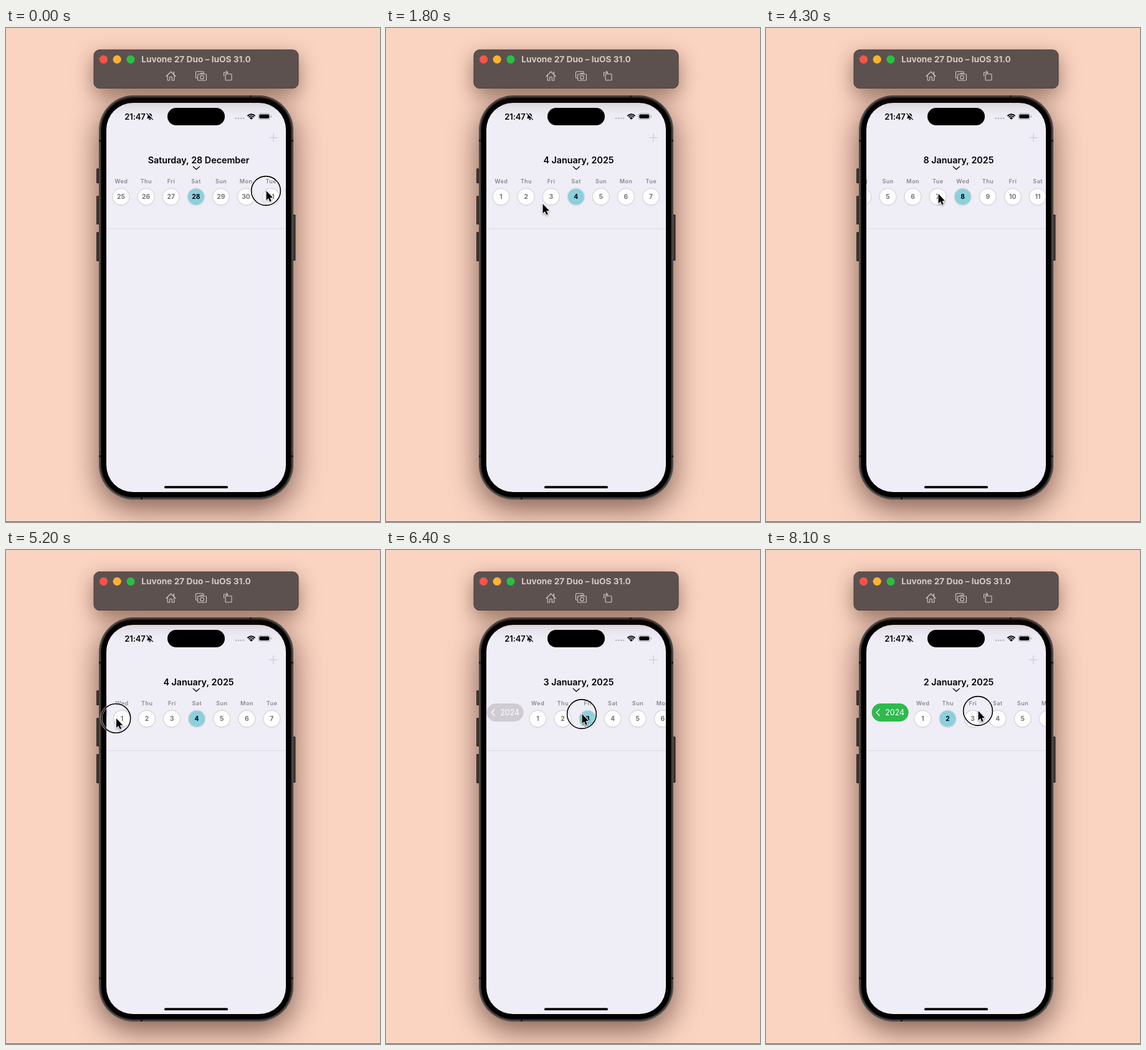
Animation of 600x792 px, one loop 8.2 s. Source, as an HTML page with a canvas:

```html
<!DOCTYPE html>
<html lang="en">
<head>
<meta charset="utf-8">
<title>Week strip</title>
<style>
html, body { margin: 0; width: 100%; height: 100%; overflow: hidden; background: #fad3c1; }
canvas { display: block; width: 600px; height: 792px; }
</style>
</head>
<body>
<canvas id="stage"></canvas>
<script>
const W = 600, H = 792, LOOP = 8200, STEP = 100;
const MID = 304.8, GAP = 40.08, SWITCH = 1200;
const SANS = 'Inter, "Liberation Sans", sans-serif';
const canvas = document.getElementById('stage');
const ratio = window.devicePixelRatio || 1;
canvas.width = W * ratio;
canvas.height = H * ratio;
const ctx = canvas.getContext('2d');

// Cursor keys: time, x, y
const PATH = [
  [0, 417, 261], [900, 254, 278], [1200, 251, 282], [1900, 251, 282],
  [2500, 276, 266], [4500, 276, 266], [5100, 174, 270], [6400, 314, 263],
  [8000, 340, 258], [LOOP, 340, 258]
];

const clamp = (v, a, b) => Math.min(b, Math.max(a, v));
const ease = u => u * u * (3 - 2 * u);
const ramp = (t, start, length) => ease(clamp((t - start) / length, 0, 1));
const rubber = x => 250 * (1 - 1 / (x * 0.55 / 250 + 1));

function cursorAt(t) {
  let i = 1;
  while (PATH[i][0] < t) i++;
  const [t0, x0, y0] = PATH[i - 1], [t1, x1, y1] = PATH[i];
  const u = ramp(t, t0, t1 - t0);
  return { x: x0 + (x1 - x0) * u, y: y0 + (y1 - y0) * u };
}

// Days are counted from 28 December; pull is the overscroll in pixels.
function stateAt(t) {
  const cursor = cursorAt(t);
  const newYear = t >= SWITCH;
  const pressed = !newYear || t >= 5100;
  let pull = 0, center = 0;
  if (!newYear) {
    pull = rubber(Math.max(0, 417 - cursor.x));
    center = pull / GAP;
  } else {
    center = 7 + 7.1 * (ramp(t, 2700, 950) - ramp(t, 3770, 1097));
    if (pressed) {
      pull = rubber(Math.max(0, cursor.x - 174));
      center -= pull / GAP;
    }
  }
  return { cursor, newYear, pressed, pull, center };
}

function box(x, y, w, h, r, fill) {
  ctx.beginPath();
  ctx.roundRect(x, y, w, h, r);
  if (fill) {
    ctx.fillStyle = fill;
    ctx.fill();
  }
}

function disc(x, y, r, fill) {
  ctx.beginPath();
  ctx.arc(x, y, r, 0, Math.PI * 2);
  if (fill) {
    ctx.fillStyle = fill;
    ctx.fill();
  }
}

function stroke(color, width) {
  ctx.strokeStyle = color;
  ctx.lineWidth = width;
  ctx.stroke();
}

function line(points, color, width) {
  ctx.beginPath();
  points.forEach(([x, y], i) => i ? ctx.lineTo(x, y) : ctx.moveTo(x, y));
  stroke(color, width);
}

function text(str, x, y, font, color, spacing = 0) {
  ctx.font = font + ' ' + SANS;
  ctx.letterSpacing = spacing + 'px';
  ctx.textAlign = 'center';
  ctx.fillStyle = color;
  ctx.fillText(str, x + spacing / 2, y);
}

function shadow(color, blur, dy) {
  ctx.shadowColor = color;
  ctx.shadowBlur = blur * ratio;
  ctx.shadowOffsetY = dy * ratio;
}

const noShadow = () => shadow('transparent', 0, 0);

function drawToolbar() {
  shadow('rgba(60,25,10,.5)', 32, 11);
  box(141, 35, 328, 62, 9, '#5d5150');
  noShadow();
  box(141, 35, 328, 61.5, 9);
  stroke('#463b39', 1);
  disc(156.5, 50.3, 6.6, '#ff5248');
  disc(178.2, 50.3, 6.6, '#ffb32d');
  disc(200, 50.3, 6.6, '#29c043');
  text('Luvone 27 Duo – luOS 31.0', 305, 55, '700 13.7px', '#d5c9c5');

  const ink = '#d3c7c3';
  line([[257, 77.5], [264.5, 70], [272, 77.5]], ink, 1.2);
  line([[259.2, 76], [259.2, 84], [262.7, 84], [262.7, 78.5], [266.3, 78.5],
    [266.3, 84], [269.8, 84], [269.8, 76]], ink, 1.1);
  line([[269.3, 74.5], [269.3, 70.5]], ink, 1.4);

  line([[306, 80.5], [304.5, 79.5], [304.5, 70.5], [306, 69.8], [316, 69.8], [317.5, 71.5]], ink, 1.1);
  ctx.beginPath();
  ctx.roundRect(307.5, 74, 14, 10, 1.5);
  stroke(ink, 1.1);
  line([[311.5, 74], [312.7, 72.5], [316.3, 72.5], [317.5, 74]], ink, 1.1);
  disc(314.5, 79, 2.8);
  stroke(ink, 1.1);

  ctx.beginPath();
  ctx.roundRect(352, 73.8, 10, 10, 1);
  stroke(ink, 1.1);
  line([[349.5, 77], [349.5, 71.3], [355.5, 71.3]], ink, 1.1);
  line([[353.3, 68.8], [355.8, 71.3], [353.3, 73.6]], ink, 1.1);
}

function drawPhone() {
  for (const [x, y, h] of [[145, 225, 24], [145, 269, 46], [145, 327, 47], [460, 299, 74]]) {
    box(x, y, 4.5, h, 1.5, '#353332');
    ctx.fillStyle = '#5d5957';
    ctx.fillRect(x + 1.5, y + 2, 1, h - 4);
  }
  shadow('rgba(50,20,10,.62)', 46, 14);
  box(149, 108, 312, 648, 56, '#393736');
  noShadow();
  box(150, 109, 310, 646, 55);
  stroke('#64605d', 1);
  box(152.5, 111.5, 305, 641, 52, '#000');
  stroke('#252423', 1);
  ctx.fillStyle = '#1c1b1b';
  for (const y of [179, 685]) {
    ctx.fillRect(149, y, 4, 3);
    ctx.fillRect(457, y, 4, 3);
  }
  ctx.fillRect(391, 108, 3, 4);
  ctx.fillRect(216, 752, 3, 4);
  box(161, 120, 288, 624, 43, '#efedf6');
}

function drawBell() {
  ctx.fillStyle = '#000';
  ctx.beginPath();
  ctx.moveTo(226, 145);
  ctx.quadraticCurveTo(227.5, 143.5, 227.5, 140.5);
  ctx.bezierCurveTo(227.5, 135.8, 234, 135.8, 234, 140.5);
  ctx.quadraticCurveTo(234, 143.5, 235.5, 145);
  ctx.closePath();
  ctx.fill();
  ctx.beginPath();
  ctx.arc(230.8, 145.7, 1.8, 0, Math.PI);
  ctx.fill();
  line([[226.2, 136.2], [236.2, 146.2]], '#efedf6', 2.6);
  line([[225.6, 136.8], [235.6, 146.8]], '#000', 1.1);
}

function drawStatus() {
  text('21:47', 207, 146.6, '600 13px', '#000', -0.1);
  drawBell();
  box(259, 128, 92, 28, 14, '#000');
  for (let i = 0; i < 4; i++) disc(369 + i * 4, 144.8, 1.35, '#b9b8c0');
  for (const r of [2, 4.9, 7.8]) {
    ctx.beginPath();
    ctx.arc(393.5, 146, r, -Math.PI * 0.75, -Math.PI * 0.25);
    stroke('#000', 1.9);
  }
  disc(393.5, 145.2, 1.2, '#000');
  box(404.8, 137, 19, 9.5, 3);
  stroke('#aaa9b0', 0.9);
  box(406.3, 138.4, 16, 6.7, 2, '#000');
  box(425, 140.2, 1.2, 3.2, 0.6, '#aaa9b0');
  line([[422.5, 175.7], [435.5, 175.7]], '#d2d0d8', 1.4);
  line([[429, 169.2], [429, 182.2]], '#d2d0d8', 1.4);
  ctx.fillStyle = '#dbd9e1';
  ctx.fillRect(161, 321.3, 288, 1);
  box(254, 734.3, 102, 3.8, 1.9, '#000');
}

function drawPill(s) {
  const edge = s.newYear ? 4 : 3;
  const side = s.newYear ? -1 : 1;
  const cx = MID + (edge - s.center) * GAP + side * 52.3;
  box(cx - 29.5, 246, 59, 29, 14.5, s.pull > 61 ? '#2eba4d' : '#cfcdd3');
  text(s.newYear ? '2024' : '2025', cx - side * 7.5, 265, '400 12.4px', '#fff');
  const tip = cx + side * 22;
  line([[tip - side * 5, 255.5], [tip, 260.5], [tip - side * 5, 265.5]], '#fff', 1.3);
}

function drawDay(day, s, picked) {
  const date = new Date(2024, 11, 28 + day);
  const x = MID + (day - s.center) * GAP;
  text(date.toLocaleDateString('en-GB', { weekday: 'short' }), x, 248.8, '600 9px', '#88878d', 0.5);
  shadow('rgba(60,60,80,.16)', 2, 0.6);
  disc(x, 270.5, 13.4, picked ? '#8bd0dd' : '#fefefe');
  noShadow();
  stroke('#d6d4da', 1.1);
  text(date.getDate(), x, 274.3, '700 10.3px', picked ? '#000' : '#75747a');
}

function drawStrip(s) {
  const low = s.newYear ? 4 : -40, high = s.newYear ? 60 : 3;
  const picked = clamp(Math.round(s.center), low, high);
  const date = new Date(2024, 11, 28 + picked);
  const name = opts => date.toLocaleDateString('en-GB', opts);
  const dayMonth = date.getDate() + ' ' + name({ month: 'long' });
  const title = s.newYear ? dayMonth + ', ' + date.getFullYear() : name({ weekday: 'long' }) + ', ' + dayMonth;
  text(title, 309, 216.6, '600 14.3px', '#000');
  line([[300.3, 222.3], [305.3, 226.8], [310.3, 222.3]], '#000', 1.3);

  ctx.save();
  ctx.beginPath();
  ctx.rect(161, 232, 288, 60);
  ctx.clip();
  const first = Math.max(low, Math.floor(s.center) - 5);
  const last = Math.min(high, Math.ceil(s.center) + 5);
  for (let day = first; day <= last; day++) drawDay(day, s, day === picked);
  drawPill(s);
  ctx.restore();
}

function drawCursor({ cursor: { x, y }, pressed }) {
  if (pressed) {
    disc(x, y, 23.4);
    stroke('rgba(255,255,255,.75)', 3.2);
    stroke('#000', 1.6);
  }
  ctx.save();
  ctx.translate(x + 0.6, y);
  ctx.beginPath();
  const arrow = [[0, 0], [0, 15.2], [3.4, 12], [5.8, 17.4], [8.2, 16.4], [5.9, 11.2], [10.4, 11]];
  arrow.forEach(([px, py]) => ctx.lineTo(px, py));
  ctx.closePath();
  shadow('rgba(0,0,0,.35)', 3, 1.5);
  stroke('#fff', 1.8);
  noShadow();
  ctx.fillStyle = '#000';
  ctx.fill();
  ctx.restore();
}

function draw(t) {
  const s = stateAt(t);
  ctx.setTransform(ratio, 0, 0, ratio, 0, 0);
  ctx.lineJoin = 'round';
  ctx.lineCap = 'round';
  ctx.fillStyle = '#fad3c1';
  ctx.fillRect(0, 0, W, H);
  drawPhone();
  drawToolbar();
  drawStatus();
  drawStrip(s);
  drawCursor(s);
  ctx.fillStyle = '#6e5f58';
  ctx.fillRect(0, 791, W, 1);
}

const start = performance.now();
let shown = -1;
function tick() {
  const t = Math.floor((performance.now() - start) % LOOP / STEP) * STEP;
  if (t !== shown) {
    shown = t;
    draw(t);
  }
  requestAnimationFrame(tick);
}
tick();
</script>
</body>
</html>
```
